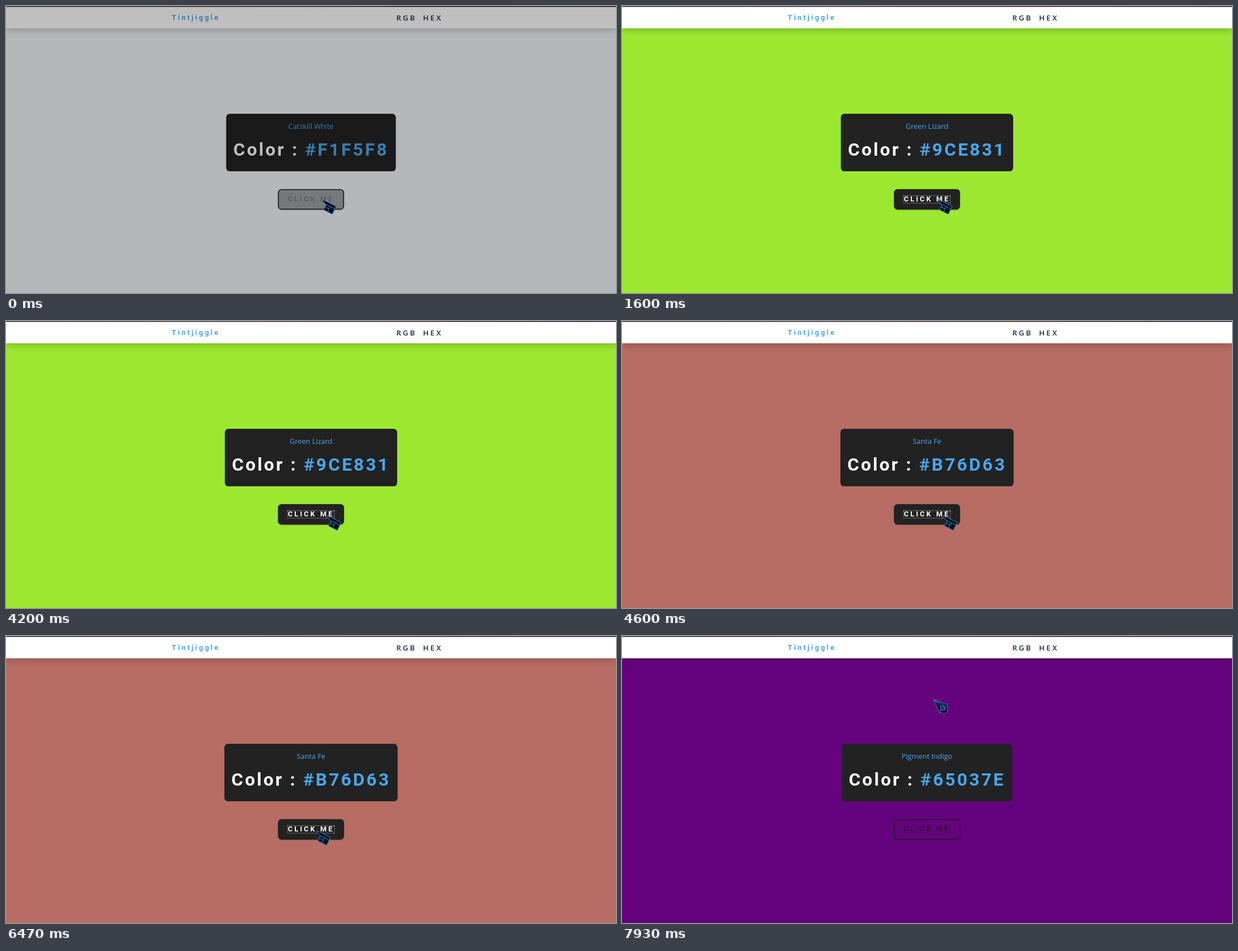
An HTML page that plays this animation: 1090 px wide and 514 px high, repeating every 8000 ms.

```html
<!DOCTYPE html>
<html lang="en">
<head>
<meta charset="utf-8">
<title>Color picker</title>
<style>
  * { box-sizing: border-box; }
  html, body { margin: 0; width: 100%; height: 100%; overflow: hidden; }
  body { position: relative; background: var(--bg); }
  body > * { position: absolute; }

  /* a 1366px wide page shown at 1090px */
  .page {
    width: 1366px; height: 645px; overflow: hidden; white-space: pre;
    transform: scale(.79795); transform-origin: 0 0;
  }
  .page > * { position: absolute; left: 0; right: 0; }

  nav { top: 0; height: 50px; background: #fff; box-shadow: 0 5px 15px rgb(0 0 0 / .2); }
  nav::before {
    content: ""; position: absolute; inset: 0 0 auto; height: 2px;
    background: linear-gradient(90deg, #203540, #4a2c30 35%, #40222e 70%, #261a38);
  }
  nav span { position: absolute; letter-spacing: 4px; }
  .logo { left: 371px; top: 16px; font: 700 16px/20px Roboto, sans-serif; color: #49a6e9; }
  .link { top: 17px; font: 600 16.500px/20px "Open Sans", sans-serif; color: #102a42; }

  .card, .btn { width: fit-content; margin: 0 auto; }
  .card {
    top: 242px; height: 128.700px; padding: 16px; border-radius: 8px;
    background: #222; color: #fff; text-align: center;
  }
  .name { font: 16.200px/24px "Open Sans", sans-serif; color: #49a6e9; }
  .code { margin-top: 16px; font: 700 40px/50px Roboto, sans-serif; letter-spacing: 4.100px; }
  .code b { color: #49a6e9; }

  .btn {
    --v: calc(34 + 221 * var(--h));
    top: 410.700px; padding: 12px 20px;
    border: 2px solid #222; border-radius: 8px;
    background: rgb(34 34 34 / var(--h)); color: rgb(var(--v) var(--v) var(--v));
    box-shadow: 0 1px 3px rgb(0 0 0 / .2);
    font: 700 16px/18.750px Roboto, sans-serif; letter-spacing: 4px;
  }
  .ring { position: absolute; inset: 12px 19px; border: 1px dotted; opacity: .85; }

  .dim { inset: 0; background: #000; }
  svg { left: 0; top: 0; width: 30px; height: 30px; overflow: visible; }
  path { fill: none; stroke: #3d96da; stroke-width: .9; stroke-linejoin: round; }
  .body { fill: #07111f; fill-rule: evenodd; }
</style>
</head>
<body>
<div class="page">
  <nav>
    <span class="logo">Tintjiggle</span>
    <span class="link" style="left:874px">RGB</span>
    <span class="link" style="left:934px">HEX</span>
  </nav>
  <div class="card"><div class="name"></div><div class="code">Color : <b></b></div></div>
  <div class="btn">CLICK ME<div class="ring"></div></div>
</div>
<div class="dim"></div>
<svg>
  <g id="hand">
    <path class="body" d="M0 0L10 4L25 12L18 26L2 18L7 9L1 3Z"/>
    <path d="M7 9L18 14L22 17M5 13L12 16L15 12M12 16L10 22"/>
  </g>
  <g id="arrow">
    <path class="body" d="M0 0L24 9L25 20L20 25L10 23ZM12 12V19H19V12Z"/>
    <path d="M0 0L12 12M0 0L17 10L21 12V18L19 19M12 19L11 23"/>
  </g>
</svg>
<script>
  const LOOP = 8000, TICK = 200 / 3, LEG = 200, FADE = 300;
  const $ = s => document.querySelector(s);
  const clamp = (v, max) => Math.min(Math.max(v, 0), max);

  const themes = [
    { start: 0, name: "Catskill White", color: "#F1F5F8" },
    { start: 1600, name: "Green Lizard", color: "#9CE831" },
    { start: 4600, name: "Santa Fe", color: "#B76D63" },
    { start: 6870, name: "Pigment Indigo", color: "#65037E" }
  ];

  // pointer strolls: one key point per LEG, joined by a smooth curve
  const trips = [
    { start: 2600, via: [[565, 347], [628, 270], [575, 208], [506, 200], [488, 322], [548, 357], [568, 358], [574, 349]] },
    { start: 5333, via: [[574, 349], [605, 243], [493, 217], [478, 302], [528, 345], [553, 349], [555, 349]] },
    { start: 7133, via: [[555, 349], [535, 281], [474, 234], [477, 230], [557, 114]] }
  ];

  // the pointer enters and leaves the button in turn
  const crossings = [-120, 2640, 3440, 5370, 6000, 7290];

  const current = (list, t) => list.findLast(item => item.start <= t) ?? list[0];

  function spline(a, b, c, d, u) {
    const m = (c - a) / 2, n = (d - b) / 2;
    return b + u * (m + u * (3 * (c - b) - 2 * m - n + u * (2 * (b - c) + m + n)));
  }

  function pointer(t) {
    const { start, via } = current(trips, t);
    const last = via.length - 1;
    const p = clamp((t - start) / LEG, last);
    const i = Math.min(Math.floor(p), last - 1);
    const key = k => via[clamp(k, last)];
    return [0, 1].map(axis =>
      spline(...[i - 1, i, i + 1, i + 2].map(k => key(k)[axis]), p - i));
  }

  function hover(t) {
    const i = crossings.findLastIndex(c => c <= t);
    const ramp = clamp((t - crossings[i]) / FADE, 1);
    const over = i % 2 === 0;
    return { over, amount: over ? ramp : 1 - ramp };
  }

  function draw(t) {
    const { name, color } = current(themes, t);
    $(".name").textContent = name;
    $(".code b").textContent = color;
    document.body.style.setProperty("--bg", color);

    const step = Math.floor(t / TICK + .1) * TICK;
    const [x, y] = pointer(step).map(Math.round);
    const { over, amount } = hover(step);
    $(".btn").style.setProperty("--h", amount);
    $("svg").style.transform = `translate(${x}px, ${y}px)`;
    $("#hand").style.display = over ? "" : "none";
    $("#arrow").style.display = over ? "none" : "";

    // the first press wakes the dimmed window
    $(".ring").style.display = t < 1270 ? "none" : "";
    $(".dim").style.opacity = t < 1270 ? .25 : t < 1330 ? .16 : 0;
  }

  const began = performance.now();
  function frame() {
    draw((performance.now() - began) % LOOP);
    requestAnimationFrame(frame);
  }
  frame();
</script>
</body>
</html>
```
